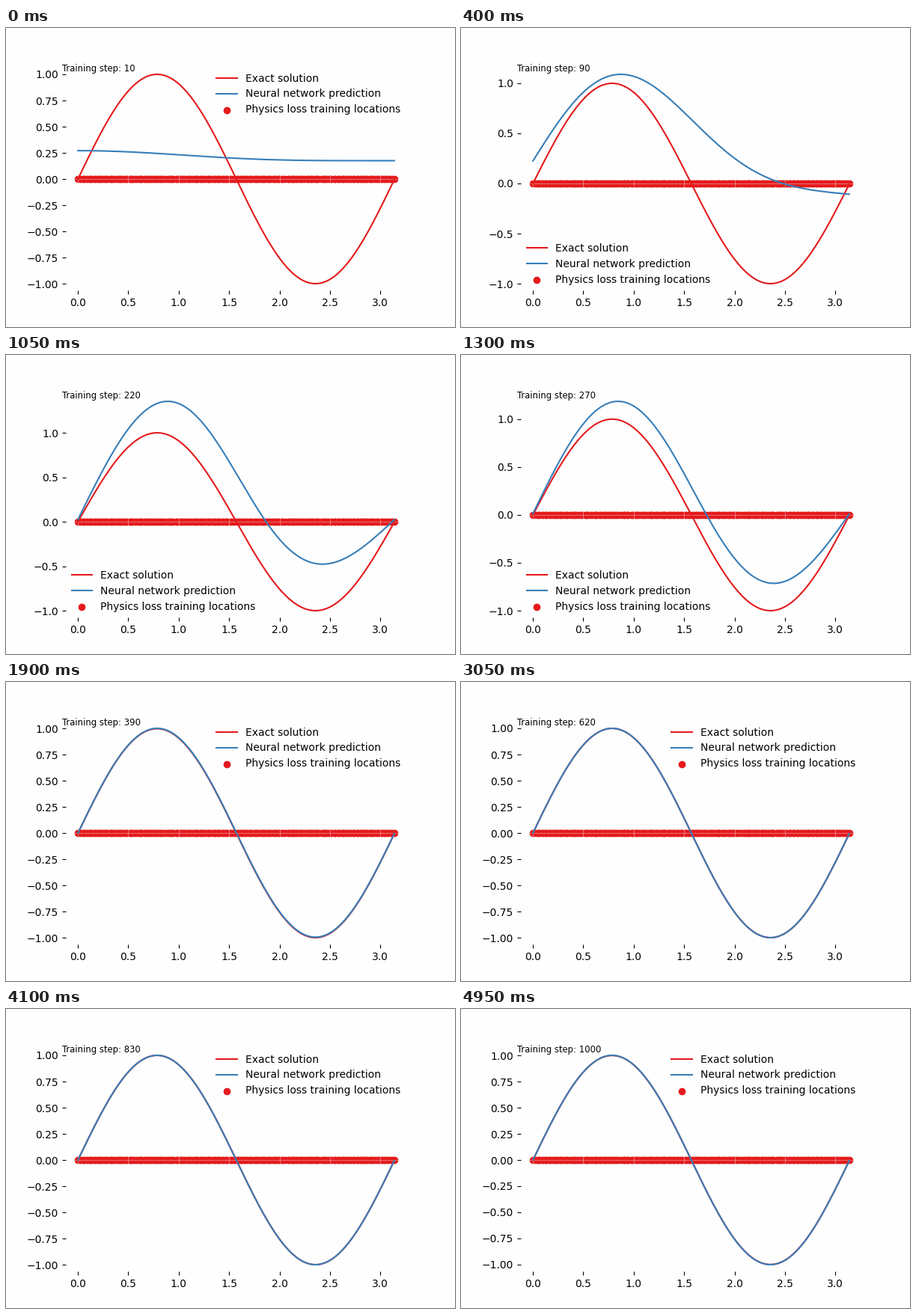
These frames come from a looping animation (600x400 px, 5000 ms). A matplotlib script:

```python
import numpy as np
import matplotlib.pyplot as plt
from matplotlib.animation import FuncAnimation

FRAMES, INTERVAL = 100, 50
RED, BLUE, PAPER = "#e41a1c", "#377eb8", "#fefefe"
SPAN = 0.999 * np.pi

plt.rcParams["font.family"] = "DejaVu Sans"

x = np.linspace(0, SPAN, 300)
exact = np.sin(2 * x)


def waves(*amps):
    return sum(a * np.sin(k * x) for k, a in enumerate(amps, 1))


# Untrained output, then the errors left at steps 140 and 220
flat = 0.2105 + 0.048 * np.cos(x) + 0.0125 * np.cos(2 * x)
early_error = 0.2 - 0.148 * x + waves(1.018, -0.33, 0.1, -0.005)
late_error = 0.025 + waves(0.545, -0.1, 0.028, -0.03)


def mix(a, b, w):
    return a + w * (b - a)


def prediction(step):
    if step <= 140:
        s = (step - 10) / 130
        ease = mix(s, s * s * (3 - 2 * s), 0.5)
        return mix(flat, exact + early_error, ease)
    if step <= 220:
        return exact + mix(early_error, late_error, (step - 140) / 80)
    d = step - 220
    curve = exact + late_error * np.exp(-d / 172 - (d / 88) ** 2)
    if step > 550:
        # faint optimiser jitter
        curve = curve + 0.003 * np.sin(np.pi * (step - 620) / 35) * exact
    return curve


def legend_place(curve):
    """Move the legend down once the curve would run through it."""
    low = min(curve.min(), -1)
    high = max(curve.max(), 1)
    level = (np.interp(1.33, x, curve) - low) / (high - low)
    return "lower left" if level > 0.789 else "upper right"


fig, ax = plt.subplots(figsize=(6, 4), dpi=100, facecolor=PAPER)
ax.set_facecolor(PAPER)
for spine in ax.spines.values():
    spine.set_visible(False)
ax.tick_params(direction="in")
ax.grid(color="white", alpha=0.35)

# Random locations, one per equal slice, so no wide gaps open up
count = 170
rng = np.random.default_rng(4)
spots = SPAN * (np.arange(count) + rng.random(count)) / count
spots[0], spots[-1] = 0, SPAN

ax.plot(x, exact, color=RED, label="Exact solution")
guess, = ax.plot(x, flat, color=BLUE, label="Neural network prediction")
ax.scatter(spots, np.zeros(count), color=RED,
           label="Physics loss training locations")
caption = ax.text(0, 1, "", transform=ax.transAxes, fontsize="small",
                  ha="left", va="top")
legend = ax.legend(frameon=False, loc="upper right")


def draw(i):
    step = 10 * (i + 1)
    curve = prediction(step)
    guess.set_ydata(curve)
    caption.set_text(f"Training step: {step}")
    legend.set_loc(legend_place(curve))
    ax.relim()
    ax.autoscale_view()
    return guess, caption, legend


anim = FuncAnimation(fig, draw, frames=FRAMES, interval=INTERVAL,
                     init_func=lambda: draw(0), repeat=True, repeat_delay=0)
plt.show()
```
